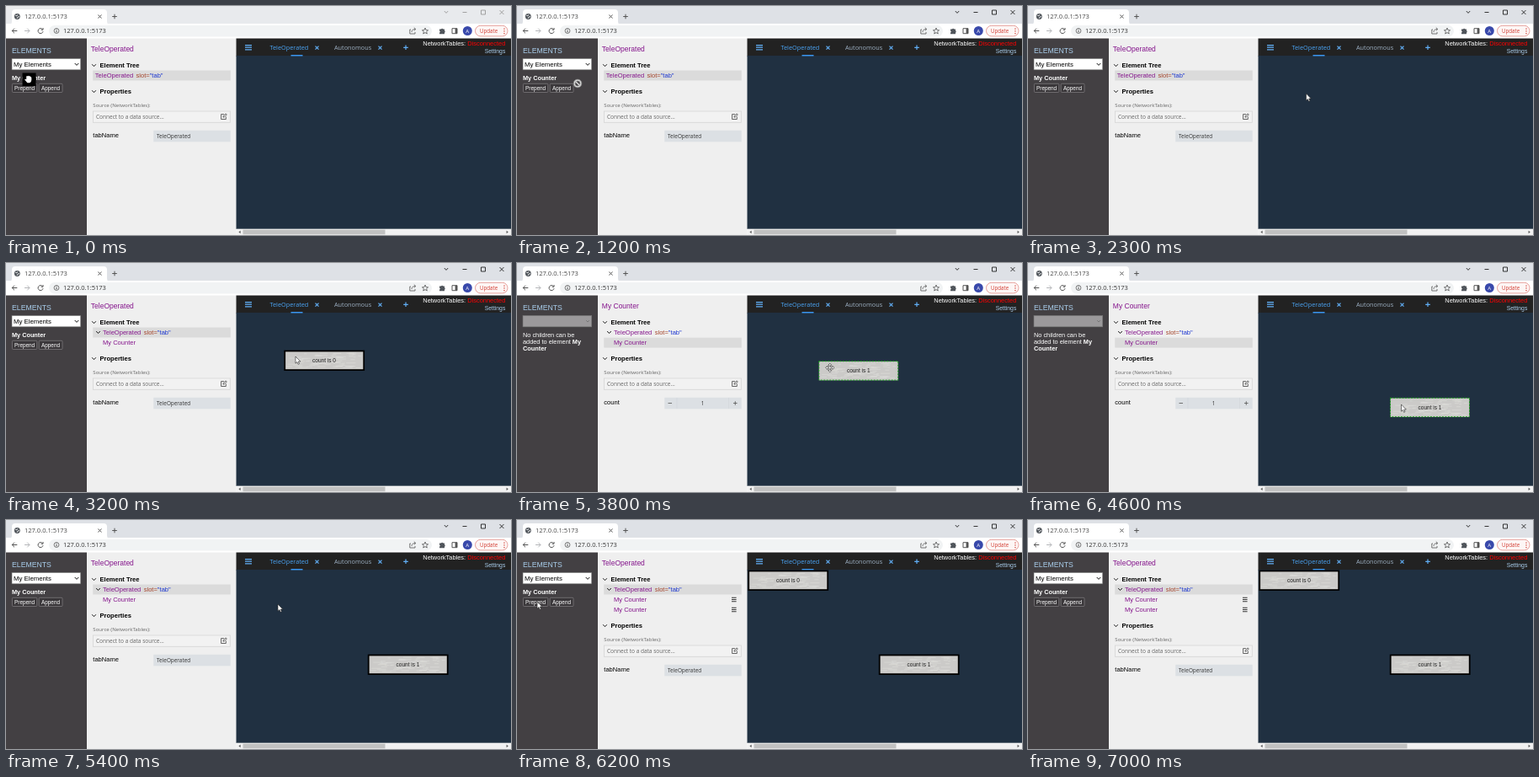
An HTML page for the animation above (7500 ms loop, 600 by 272 pixels).

```html
<!DOCTYPE html>
<html lang="en">
<head>
<meta charset="utf-8">
<title>Dashboard editor</title>
<style>
  html, body { margin: 0; width: 100%; height: 100%; overflow: hidden; }
  svg { display: block; width: 600px; height: 272px; font: 7.55px "Liberation Sans", Arial, sans-serif; }
  text { white-space: pre; }
  .ui { font-family: "Open Sans", sans-serif; }
  .bold { font-weight: bold; }
  .mid { text-anchor: middle; }
  .end { text-anchor: end; }
  .tag { fill: #85158c; }
  .attr { fill: #a5452c; }
  .val { fill: #1a35d0; }
  .line { fill: none; stroke: #555; }
  .small { font-size: 6.4px; }
</style>
</head>
<body>
<svg viewBox="0 0 600 272">
  <defs>
    <path id="chevron" d="M-2.3-1.2 0 1.2 2.3-1.2" class="line" style="stroke:#111"/>
    <path id="cross" d="M-2-2 2 2M2-2-2 2"/>
    <path id="plus" d="M-2.8 0H2.8M0-2.8V2.8"/>
    <path id="bars" d="M0-2.2H5.6M0 0H5.6M0 2.2H5.6"/>
  </defs>

  <!-- browser window -->
  <rect id="frame" width="600" height="22"/>
  <path d="M4 22Q7 22 7 18V8Q7 4 11 4H116Q120 4 120 8V18Q120 22 123 22Z" fill="#fff"/>
  <rect y="21" width="600" height="17.5" fill="#fff"/>
  <circle cx="13.3" cy="12.5" r="3.4" fill="#50555b"/>
  <path d="M11 11.2l2 .6.8-1.6M13 15l1-2 2-.4" fill="none" stroke="#fff" stroke-width=".8"/>
  <text class="ui" x="22" y="15.3" font-size="7.5" fill="#444">127.0.0.1:5173</text>
  <g class="line">
    <use href="#cross" x="111.5" y="12.5"/>
    <use href="#plus" x="129" y="12.5"/>
  </g>
  <g id="controls" fill="none" stroke-width=".9">
    <path d="M520.8 6 523 8.4 525.2 6M542.5 7.5H547.5M564.5 5H569.5V10H564.5ZM586.5 5 591.5 10M591.5 5 586.5 10"/>
  </g>
  <rect x="51" y="23" width="455" height="13.4" rx="6.7" fill="#f1f3f4"/>
  <g class="line">
    <path d="M13.3 29.5H7.2M10 26.7 7.2 29.5 10 32.3"/>
    <path d="M22 29.5H28M25.3 26.7 28 29.5 25.3 32.3" stroke="#b5b7ba"/>
    <path d="M43.3 27.6A3 3 0 1 0 44 30.2M44 26V28.3H41.7"/>
    <circle cx="60" cy="29.5" r="2.9" stroke-width=".8"/>
    <path d="M60 29V31.2M60 27.5V28.3"/>
    <path d="M481 28H479.8V33H486V31M482 31Q482 27.5 486.5 27.5M484.8 25.6 486.8 27.5 484.8 29.4" stroke-width=".8"/>
    <path d="M498 26 499 28.6 501.6 28.8 499.6 30.5 500.3 33 498 31.6 495.7 33 496.4 30.5 494.4 28.8 497 28.6Z" stroke-width=".8"/>
    <path d="M530 26.7H536V32.7H530Z"/>
  </g>
  <path d="M515 27.5H517A1.2 1.2 0 0 1 519.3 27.5H521V29.3A1.2 1.2 0 0 1 521 31.5V33.2H515V31.5A1.1 1.1 0 0 0 515 29.4Z" fill="#50555b"/>
  <path d="M533.6 26.7H536V32.7H533.6Z" fill="#555"/>
  <text class="ui" x="68" y="32.2" font-size="7.5" fill="#333">127.0.0.1:5173</text>
  <circle cx="548.3" cy="29.5" r="5.5" fill="#3949ab"/>
  <text class="mid" x="548.3" y="31.6" font-size="5.8" fill="#fff">A</text>
  <rect x="557.5" y="23.3" width="38.5" height="12.6" rx="6.3" fill="#fdf6f5" stroke="#e08a83" stroke-width=".8"/>
  <text class="ui" x="563" y="31.8" font-size="6.2" fill="#d23b30">Update</text>
  <path d="M592 26.5V33.5" stroke="#d23b30" stroke-width="1.2" stroke-dasharray="1.2 1.6"/>

  <!-- element palette -->
  <rect y="38.5" width="96" height="234" fill="#434043"/>
  <text x="7" y="55.6" font-size="8.7" fill="#a9cdec">ELEMENTS</text>
  <g id="palette">
    <rect x="7" y="62.5" width="81.7" height="13.3" fill="#fff" stroke="#777" stroke-width=".6"/>
    <text x="9" y="72" font-size="7.75">My Elements</text>
    <use href="#chevron" x="84" y="69.2"/>
    <text class="bold" x="7" y="87.5" font-size="7.3" fill="#fff">My Counter</text>
    <g fill="#3a373a" stroke="#858285" stroke-width=".7">
      <rect x="7.4" y="92.3" width="29.4" height="10.2" rx="1"/>
      <rect x="39.2" y="92.3" width="27.8" height="10.2" rx="1"/>
    </g>
    <g class="small" fill="#fff">
      <text x="10" y="99.6">Prepend</text>
      <text x="42" y="99.6">Append</text>
    </g>
  </g>
  <g id="noChildren" fill="#fff" font-size="7.35">
    <rect x="7" y="62.5" width="81.7" height="13.3" fill="#9b999b" stroke="#777" stroke-width=".6"/>
    <path d="M82.2 68.2 84 70 85.8 68.2" fill="none" stroke="#777"/>
    <text x="7" y="88">No children can be</text>
    <text x="7" y="96.2">added to element <tspan class="bold">My</tspan></text>
    <text class="bold" x="7" y="104.4">Counter</text>
  </g>

  <!-- inspector -->
  <rect x="96" y="38.5" width="177.5" height="234" fill="#efefef"/>
  <text id="title" class="tag" x="100.8" y="53.6" font-size="8.5"></text>
  <use href="#chevron" x="104.5" y="70.5"/>
  <text class="bold" x="111.5" y="73">Element Tree</text>
  <rect id="selectedRow" x="103.3" width="163.5" height="12" fill="#dbdbdb"/>
  <use id="expander" href="#chevron" x="109.5" y="82.3"/>
  <text id="rootRow" y="85"><tspan class="tag">TeleOperated</tspan><tspan class="attr" dx="3.4">slot=</tspan><tspan class="val">"tab"</tspan></text>
  <text id="child1" class="tag" x="115" y="97">My Counter</text>
  <text id="child2" class="tag" x="115" y="109">My Counter</text>
  <g id="handles" stroke="#333" stroke-width="1.1">
    <use href="#bars" x="255" y="94.5"/>
    <use href="#bars" x="255" y="106.5"/>
  </g>
  <g id="props">
    <use href="#chevron" x="104.5" y="101.5"/>
    <text class="bold" x="111.5" y="104">Properties</text>
    <text class="ui" x="103.3" y="120.2" font-size="6.1" fill="#666">Source (NetworkTables):</text>
    <rect x="103.5" y="125" width="162.8" height="13.3" fill="#f2f2f2" stroke="#d5d5d5" stroke-width=".8"/>
    <text class="ui" x="107" y="134.2" font-size="6.5" fill="#666">Connect to a data source...</text>
    <path class="line" d="M259 128.6H255.6V134.5H261.3V131.5M258 132.2 258.3 130.6 261.2 127.9 262.3 129 259.5 131.8Z" stroke-width=".9"/>
    <rect x="175.3" y="147.8" width="91.4" height="13.6" fill="#dce0e4"/>
    <g id="tabProp">
      <text x="103.3" y="156">tabName</text>
      <text class="ui small" x="179" y="157" fill="#333">TeleOperated</text>
    </g>
    <g id="countProp">
      <text x="103.3" y="156">count</text>
      <path d="M190 148V161M251.5 148V161" stroke="#d2d6da" stroke-width=".6"/>
      <path class="line" d="M179.5 154.5H184M257 154.5H261.6M259.3 152.2V156.8" stroke-width=".8"/>
      <text class="ui mid small" x="220.5" y="157" fill="#333">1</text>
    </g>
  </g>

  <!-- dashboard -->
  <rect x="273.5" y="38.5" width="326.5" height="21" fill="#222"/>
  <rect x="273.5" y="59" width="326.5" height="206" fill="#203041"/>
  <g stroke="#62b0f7" stroke-width="1.2">
    <path d="M284 46.6H292M284 49.2H292M284 51.8H292"/>
    <use href="#cross" x="369.5" y="49.7"/>
    <use href="#cross" x="444.5" y="49.7"/>
    <use href="#plus" x="475" y="49.3"/>
  </g>
  <text class="ui" x="313.5" y="52.3" font-size="7.3" fill="#4ba6f8">TeleOperated</text>
  <text class="ui" x="390" y="52.3" font-size="7.3" fill="#9fb2c5">Autonomous</text>
  <rect x="338.5" y="58" width="14" height="1.5" fill="#3b96f0"/>
  <text class="end" x="593.3" y="47.4" font-size="7.45" fill="#fff">NetworkTables: <tspan fill="#f00">Disconnected</tspan></text>
  <text class="end" x="593.3" y="56.4" font-size="6.8" fill="#a9cdec">Settings</text>
  <rect x="273.5" y="264.7" width="326.5" height="7.3" fill="#f1f1f1"/>
  <rect x="281.5" y="265.7" width="169" height="5.6" fill="#c1c1c1"/>
  <path d="M278.6 266.7V270.3L276.4 268.5ZM594.6 266.7V270.3L596.8 268.5Z" fill="#555"/>

  <g id="counter"></g>
  <g id="newCounter" transform="translate(274 59.5)"></g>

  <!-- pointers -->
  <g id="grab">
    <rect x="-6.5" y="-7.5" width="16" height="15.5"/>
    <path d="M-1.8-2.5V-3.4Q-.9-4.4 0-3.4 .9-4.8 1.7-3.5 2.8-4.2 3.2-2.7 4.3-2.9 4.3-1.6V1Q4 3.6 2.3 4.2H-.7L-3.8 .5Q-3.4-.9-1.8 .2Z" fill="#fff"/>
  </g>
  <g id="denied" fill="none" stroke="#777">
    <circle r="4.9" fill="#ddd" stroke-width=".8"/>
    <circle r="2.9" fill="#434043" stroke-width=".8"/>
    <path d="M-2.3-2.3 2.3 2.3" stroke="#ddd" stroke-width="1.5"/>
  </g>
  <path id="arrow" d="M0 0V8.2L1.9 6.5 3.1 9.3 4.5 8.7 3.3 6H5.8Z" fill="#fff" stroke="#222" stroke-width=".6"/>
  <path id="move" d="M0-5.3 2-3H.7V-.7H3V-2L5.3 0 3 2V.7H.7V3H2L0 5.3-2 3H-.7V.7H-3V2L-5.3 0-3-2V-.7H-.7V-3H-2Z" fill="#fff" stroke="#222" stroke-width=".6"/>
</svg>
<script>
const LOOP = 7500, STEP = 100;
const FOCUS = 800, DRAG = 1000, DROP = 2400, SELECT = 3400, RELEASE = 4600,
      DESELECT = 5400, PREPEND = 6200, LEAVE = 6700;

// time, x, y of the pointer
const path = [
  [0, 26, 87], [DRAG, 26, 87], [1200, 72, 92], [1400, 118, 93], [1700, 118, 93],
  [2300, 330.5, 104], [2500, 330.5, 104], [3200, 344, 111], [3600, 344, 112],
  [4100, 413.5, 143], [4500, 443.5, 168], [RELEASE, 443.5, 168], [4900, 329, 131],
  [5200, 323, 100], [DESELECT, 323, 100], [6100, 24, 97], [LOOP, 24, 97]
];

const $ = id => document.getElementById(id);
const show = (id, on) => { $(id).style.display = on ? '' : 'none'; };
const moveTo = (id, x, y) => $(id).setAttribute('transform', `translate(${x} ${y})`);

function pointerAt(t) {
  const i = path.findIndex(p => p[0] > t);
  const [t0, x0, y0] = path[i - 1], [t1, x1, y1] = path[i];
  const k = (t - t0) / (t1 - t0);
  return [x0 + (x1 - x0) * k, y0 + (y1 - y0) * k];
}

function buildCounter(id) {
  let seed = 7, streaks = '';
  const random = () => (seed = seed * 16807 % 2147483647) / 2147483647;
  for (let i = 0; i < 70; i++) {
    const w = 3 + random() * 9;
    streaks += `M${2.5 + random() * (90 - w)} ${3 + random() * 18}h${w}`;
  }
  $(id).innerHTML = `
    <rect x="1" y="1" width="94" height="22.5" fill="#cbcac8"/>
    <path d="${streaks}" stroke="#dedddb" stroke-width=".6"/>
    <rect class="border" fill="none"/>
    <text class="mid" x="48" y="14.4" font-size="6.5" fill="#222">count is 0</text>`;
  setBorder(id, false);
}

function setBorder(id, selected) {
  const style = selected
    ? { x: 1, y: .8, width: 94, height: 22.4, stroke: '#18a018', 'stroke-width': 1, 'stroke-dasharray': '2 1.5' }
    : { x: 1.2, y: 1, width: 94, height: 22.6, stroke: '#000', 'stroke-width': 1.8, 'stroke-dasharray': 'none' };
  const border = $(id).querySelector('.border');
  for (const key in style) border.setAttribute(key, style[key]);
}

function render(t) {
  const focused = t >= FOCUS;
  $('frame').setAttribute('fill', focused ? '#dee1e6' : '#e8eaed');
  $('controls').setAttribute('stroke', focused ? '#222' : '#999');

  const selected = t >= SELECT && t < DESELECT;
  const children = (t >= DROP) + (t >= PREPEND);
  show('palette', !selected);
  show('noChildren', selected);
  show('tabProp', !selected);
  show('countProp', selected);
  $('title').textContent = selected ? 'My Counter' : 'TeleOperated';
  $('selectedRow').setAttribute('y', selected ? 88.6 : 76.5);
  $('rootRow').setAttribute('x', children ? 115 : 105.8);
  show('expander', children > 0);
  show('child1', children > 0);
  show('child2', children > 1);
  show('handles', children > 1);
  moveTo('props', 0, children * 12);

  const [x, y] = pointerAt(t);
  const [cx, cy] = t < 3600 ? [344, 112] : t < RELEASE ? [x, y] : [443.5, 168];
  show('counter', children > 0);
  show('newCounter', children > 1);
  moveTo('counter', cx - 14, cy - 8.5);
  setBorder('counter', selected);
  $('counter').querySelector('text').textContent = 'count is ' + (t < SELECT ? 0 : 1);

  const pointer = t < DRAG ? 'grab'
    : t < DROP && x < 273.5 ? 'denied'
    : t >= SELECT && t < RELEASE ? 'move'
    : t < LEAVE ? 'arrow' : '';
  for (const id of ['grab', 'denied', 'arrow', 'move']) show(id, id === pointer);
  if (pointer) moveTo(pointer, x, y);
}

function tick() {
  render(Math.floor(performance.now() % LOOP / STEP) * STEP);
  requestAnimationFrame(tick);
}

buildCounter('counter');
buildCounter('newCounter');
tick();
</script>
</body>
</html>
```
